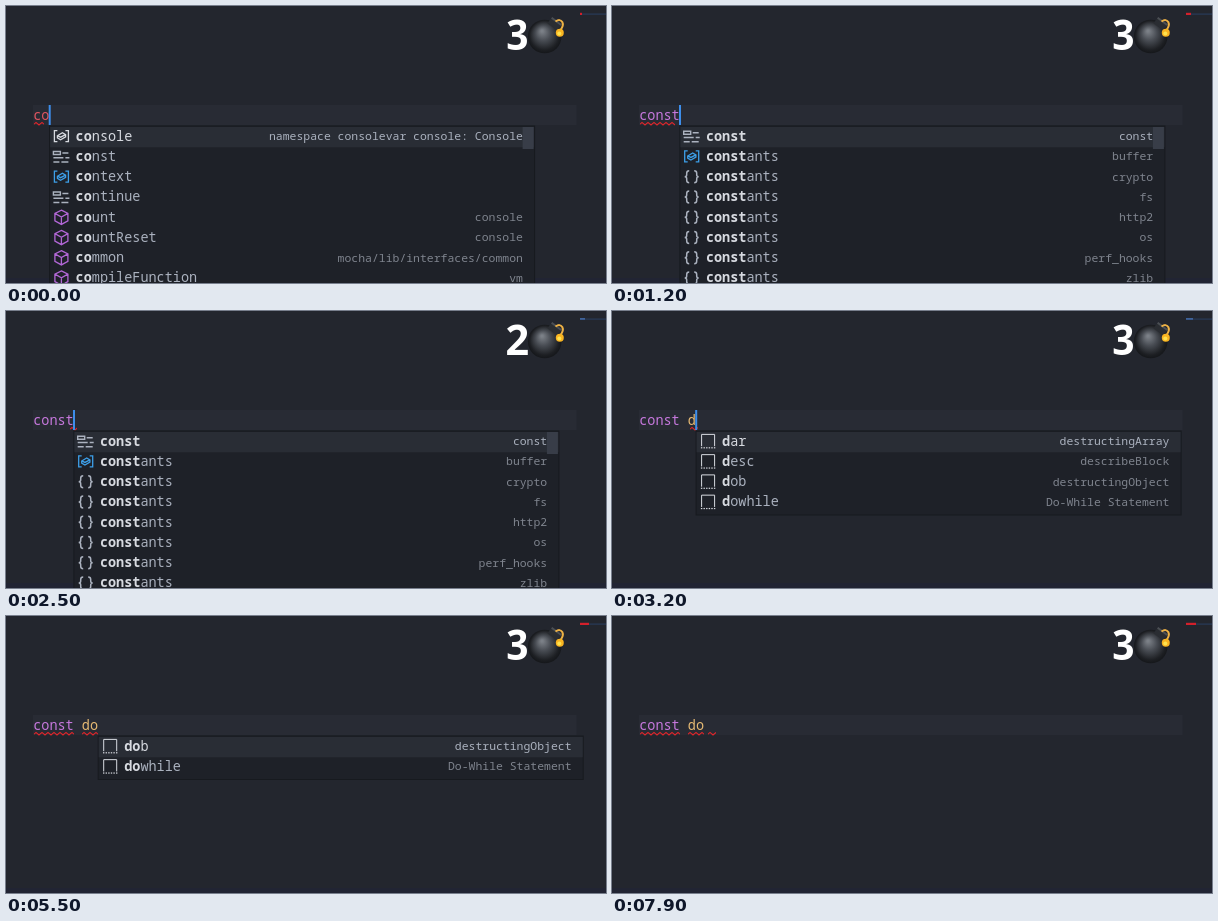
Animation, 600 px wide and 277 px high, one loop 8000 ms. Source, as an HTML page with a canvas:

```html
<!DOCTYPE html>
<html lang="en">
<head>
<meta charset="utf-8">
<title>Typing against the clock</title>
<style>
html, body { margin: 0; width: 100%; height: 100%; overflow: hidden; background: #23262e; }
canvas { display: block; }
</style>
</head>
<body>
<canvas id="stage" width="600" height="277"></canvas>
<script>
const c = document.getElementById('stage').getContext('2d');
const LOOP = 8000, LEFT = 27.2, CHAR = 8.1, TOP = 120, ROW = 20.25;
const MONO = '"Noto Sans Mono", "DejaVu Sans Mono", monospace';
const RED = '#e0262b', PURPLE = '#c678dd', BLUE = '#3d9fe8', PALE = '#d7dae0', GREY = '#abb2bf', DIM = '#7f848e';

// Suggestions: [icon, label, detail]
const constants = ['buffer', 'crypto', 'fs', 'http2', 'os', 'perf_hooks', 'zlib']
  .map((m, i) => [i ? 'module' : 'variable', 'constants', m]);
const consoleRow = ['variable', 'console', 'namespace consolevar console: Console'];
const words = [['keyword', 'const', ''], ['variable', 'context', ''], ['keyword', 'continue', '']];
const lists = {
  co: [consoleRow, ...words, ['method', 'count', 'console'], ['method', 'countReset', 'console'],
    ['method', 'common', 'mocha/lib/interfaces/common'], ['method', 'compileFunction', 'vm']],
  con: [consoleRow, ...words, ...constants.slice(0, 4)],
  cons: [words[0], consoleRow, ...constants.slice(0, 6)],
  const: [['keyword', 'const', 'const'], ...constants],
  d: [['snippet', 'dar', 'destructingArray'], ['snippet', 'desc', 'describeBlock'],
    ['snippet', 'dob', 'destructingObject'], ['snippet', 'dowhile', 'Do-While Statement']],
  do: [['snippet', 'dob', 'destructingObject'], ['snippet', 'dowhile', 'Do-While Statement']]
};

const edits = [[0, 'co'], [300, 'con'], [700, 'cons'], [1100, 'const'], [2600, 'const '],
  [3100, 'const d'], [4900, 'const do'], [7000, 'const do ']];

// Error underlines as x ranges, and the red length in the minimap
const errors = [
  [0, 2, [28, 38]], [300, 3, [28, 46]], [700, 4, [28, 54]], [1100, 5, [28, 63]], [1800, 0, [64, 71]],
  [3100, 0, [78, 86]], [4300, 2, [76, 86]], [4900, 2, [76, 92]],
  [5500, 9, [28, 68], [76, 92]], [7900, 10, [28, 68], [76, 92], [96, 104]]
];

const latest = (list, t) => list.filter(e => e[0] <= t).pop();

function rect(x, y, w, h, color) {
  c.fillStyle = color;
  c.fillRect(x, y, w, h);
}

function text(s, x, y, size, color, style = '400', align = 'left') {
  c.font = `${style} ${size}px ${MONO}`;
  c.fillStyle = color;
  c.textAlign = align;
  c.fillText(s, x, y);
}

function path(d, color, width = 1.3) {
  c.strokeStyle = color;
  c.lineWidth = width;
  c.stroke(new Path2D(d));
}

function disc(x, y, r, color) {
  c.fillStyle = color;
  c.beginPath();
  c.arc(x, y, r, 0, 7);
  c.fill();
}

function squiggle([from, to]) {
  c.save();
  c.beginPath();
  c.rect(from, 115, to - from, 6);
  c.clip();
  let d = `M${from - 1} 119`;
  for (let x = from + 2, up = true; x < to + 3; x += 3, up = !up) d += `L${x} ${up ? 116.4 : 119}`;
  path(d, RED, 1.1);
  c.restore();
}

// Icons fit a 16 px box
const icons = {
  variable(color) {
    path('M4 2.5H1V13.5H4M12 2.5H15V13.5H12', color);
    path('M4 7.5L9 4.5L12.2 6.5V8.7L7.2 11.5L4 9.7ZM4 7.5L7.2 9L12.2 6.5', color);
  },
  keyword() {
    path('M0 3H7V6H0ZM9 4.5H15M0 9.3H10M12 9.3H16M0 13.5H6M8 13.5H15', GREY, 1.4);
  },
  module() {
    path('M5.5 2Q3 2 3 4.5V6Q3 8 1 8Q3 8 3 10V11.5Q3 14 5.5 14M10.5 2Q13 2 13 4.5V6Q13 8 15 8Q13 8 13 10V11.5Q13 14 10.5 14', GREY, 1.5);
  },
  method() {
    path('M8 1L14.5 4.2V11.7L8 15.2L1.5 11.7V4.2ZM1.5 4.2L8 7.8L14.5 4.2M8 7.8V15', '#b267d6');
  },
  snippet() {
    path('M1.7 13V1.2H14.7V13', PALE, 1);
    for (let x = 1; x < 16; x += 2.6) rect(x, 14, 1.4, 1.2, PALE);
  }
};

function popup(x, prefix) {
  const rows = lists[prefix], h = rows.length * ROW + 3;
  rect(x - .5, TOP - .5, 486, h + 1, '#171a1f');
  rect(x + .5, TOP + .5, 484, h - 1, '#1e2128');
  rect(x + .5, TOP + 1, 484, ROW, '#292d35');
  if (rows.length > 4) rect(x + 473, TOP + 1, 11, 22, '#383d48');
  rows.forEach(([icon, label, detail], i) => {
    const y = TOP + 1 + i * ROW, cut = prefix.length;
    c.save();
    c.translate(x + 3.8, y + 1.2);
    icons[icon](i ? BLUE : PALE);
    c.restore();
    text(label.slice(0, cut), x + 26, y + 13.6, 13.5, PALE, '700');
    text(label.slice(cut), x + 26 + cut * CHAR, y + 13.6, 13.5, i ? GREY : PALE);
    text(detail, x + 473.3, y + 13, 11.45, i ? DIM : GREY, '400', 'right');
  });
}

function bomb() {
  const shade = c.createRadialGradient(536, 25, 1, 539, 30.5, 18);
  shade.addColorStop(0, '#7b8087');
  shade.addColorStop(.4, '#474b52');
  shade.addColorStop(.8, '#1d1f23');
  shade.addColorStop(1, '#121417');
  disc(538.7, 30.5, 16.8, shade);
  c.save();
  c.translate(548, 18.5);
  c.rotate(.65);
  rect(-6, -5, 12, 8, '#2a2d32');
  rect(-6, -5, 12, 2, '#4b4f54');
  c.restore();
  path('M549.5 15.5Q554 12.5 556.3 16Q558 19.5 554.5 24', '#edb145', 2);
  disc(553.8, 26.7, 4, '#f9b421');
  disc(553.3, 27.5, 2, '#ffe34f');
}

function bulb() {
  disc(36.8, 85, 4.8, '#ffc91f');
  rect(34.3, 87, 5, 4, '#ffc91f');
  rect(34.6, 91.7, 4.4, 1, '#e8b81c');
  rect(35.1, 93.5, 3.4, 1, '#e8b81c');
}

function cursorAlpha(age) {
  const p = Math.max(0, age - 300) % 1000, fade = (p < 500 ? p : 1000 - p) - 100;
  const k = Math.min(1, Math.max(0, fade / 200));
  return 1 - k * k * (3 - 2 * k);
}

function minimap(red, typed) {
  rect(574, 7.5, 26, 1.2, '#293b59');
  rect(574, 7, typed, 1.8, '#3e629a');
  if (red) rect(574, 6.8, red, 2.2, '#d3202b');
}

function draw(t) {
  const [since, line] = latest(edits, t);
  const [, red, ...spans] = latest(errors, t);
  const x = LEFT + line.length * CHAR;
  const word = line.split(' ').pop();

  rect(0, 0, 600, 277, '#23262e');
  rect(0, 272, 600, 5, '#212433');
  rect(27, 99, 543.5, 20, '#282b34');
  minimap(red, line.length);

  text(3 - Math.floor((t - since) / 1000), 511.3, 44.3, 41.5, '#fff', '600 semi-condensed', 'center');
  bomb();
  if (t >= 4300 && t < 4900) bulb();

  text(line.slice(0, 5), LEFT, 113.8, 13.5, line.length < 5 ? '#e05561' : PURPLE);
  text(line.slice(6), LEFT + 6 * CHAR, 113.8, 13.5, '#e5b973');
  spans.forEach(squiggle);
  if (word) popup(x + .2, word);
  c.globalAlpha = cursorAlpha(t - since);
  rect(x - .7, 99, 2, 20, '#3d8eea');
  c.globalAlpha = 1;
}

const start = performance.now();
function tick() {
  draw((performance.now() - start) % LOOP);
  requestAnimationFrame(tick);
}
tick();
</script>
</body>
</html>
```
